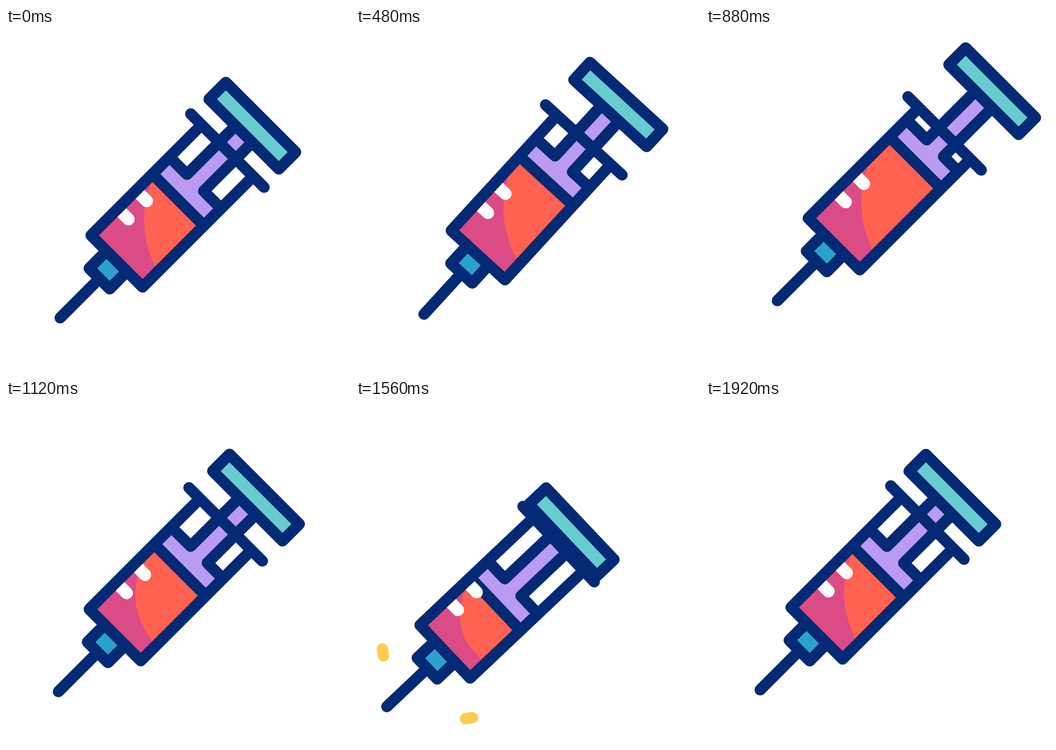
Recreate the animation shown at these times as an HTML page. Size 640 px wide and 640 px high, loop 2000 ms.

```html
<!DOCTYPE html>
<html lang="en">
<head>
<meta charset="utf-8">
<title>Syringe</title>
<style>
  html, body { margin: 0; width: 100%; height: 100%; overflow: hidden; background: #fff; }
  svg { display: block; width: 100vw; height: 100vh; }
  .line { stroke: #042a75; stroke-width: 21; stroke-linecap: round; stroke-linejoin: round; }
  .drop { stroke: #ffcb50; stroke-width: 21; stroke-linecap: round; }
</style>
</head>
<body>
<svg viewBox="0 0 640 640" fill="none">
  <defs>
    <clipPath id="inside"><path d="M-161 -62H130V-200H400V200H130V62H-161Z"/></clipPath>
    <clipPath id="glass"><rect x="-151" y="-57.25" width="290" height="114.5"/></clipPath>
  </defs>
  <path class="drop" transform="translate(49.2 463.2) rotate(-8.7)"/>
  <path class="drop" transform="translate(216.8 591) rotate(81.3)"/>
  <!-- Local axes: x runs along the barrel, y across it -->
  <g id="syringe">
    <path class="line" d="M-310 0H-206"/>
    <rect class="line" x="-206.7" y="-27" width="45.7" height="54" fill="#2aa2cf"/>
    <g clip-path="url(#inside)">
      <rect id="liquid" x="-161" y="-62" height="124" fill="#ff6250"/>
      <path id="shade" fill="#db4b86"/>
      <path id="piston" class="line" fill="#bb9af2"
        d="M.5 -95H45.5V-22H174V22H45.5V95H.5Z"/>
    </g>
    <path class="line" d="M130 -67.75H-161V67.75H130M130 -96.5V96.5"/>
    <path clip-path="url(#glass)" stroke="#fff" stroke-width="23" stroke-linecap="round"
      d="M-42.4 -75V-39.8M-90.5 -75V-39.8"/>
    <rect id="handle" class="line" x="173.5" y="-91.8" width="44.2" height="183.6" fill="#68cbd0"/>
  </g>
</svg>
<script>
const LOOP = 2000, STEP = 40, REACH = 38;
const $ = id => document.getElementById(id);
const drops = document.querySelectorAll('.drop');

// Eased 0 to 1 between two times
function ramp(t, from, to) {
  const k = Math.min(1, Math.max(0, (t - from) / (to - from)));
  return (1 - Math.cos(Math.PI * k)) / 2;
}

// Lean back by one angle, swing past upright by another, then settle
function wobble(t, start, back, over) {
  const s = t - start;
  return -back * ramp(s, 0, 160) + (back + over) * ramp(s, 160, 375) - over * ramp(s, 375, 560);
}

function draw(t) {
  const fill = ramp(t, 240, 720), push = ramp(t, 915, 1330), rest = ramp(t, 1490, 1920);
  const slide = 45.25 * (fill - push) + 56.5 * (rest - push);
  const pull = 52.5 * (fill - push) + 35 * (rest - push);
  const sway = 7 * (ramp(t, 240, 800) - ramp(t, 860, 1540));
  const tilt = wobble(t, 240, 5.2, 3.7) + wobble(t, 1230, 8.8, 2.8);
  const slosh = push - rest;

  $('syringe').setAttribute('transform',
    `translate(320 320) rotate(-45) translate(${slide} 0) rotate(${tilt})`);
  for (const id of ['piston', 'handle'])
    $(id).setAttribute('transform', `translate(${pull} ${sway})`);
  $('liquid').setAttribute('width', 161.5 + pull);

  const top = -14.8 - 44 * slosh, bend = -89.7 - 42 * slosh, end = -117.4 - 4.6 * slosh;
  $('shade').setAttribute('d',
    `M-161 -62H${top + 3}L${top} -57.4Q${bend} -22 ${end} 57L${end - 2} 62H-161Z`);

  const head = ramp(t, 1400, 1560), tail = ramp(t, 1440, 1640);
  const dash = head > tail ? `M0 ${REACH * (1 - tail)}V${REACH * (1 - head)}` : '';
  drops.forEach(drop => drop.setAttribute('d', dash));
}

const start = performance.now();
function tick(now) {
  const t = Math.max(0, now - start) % LOOP;
  draw(Math.floor(t / STEP) * STEP);
  requestAnimationFrame(tick);
}
draw(0);
requestAnimationFrame(tick);
</script>
</body>
</html>
```
